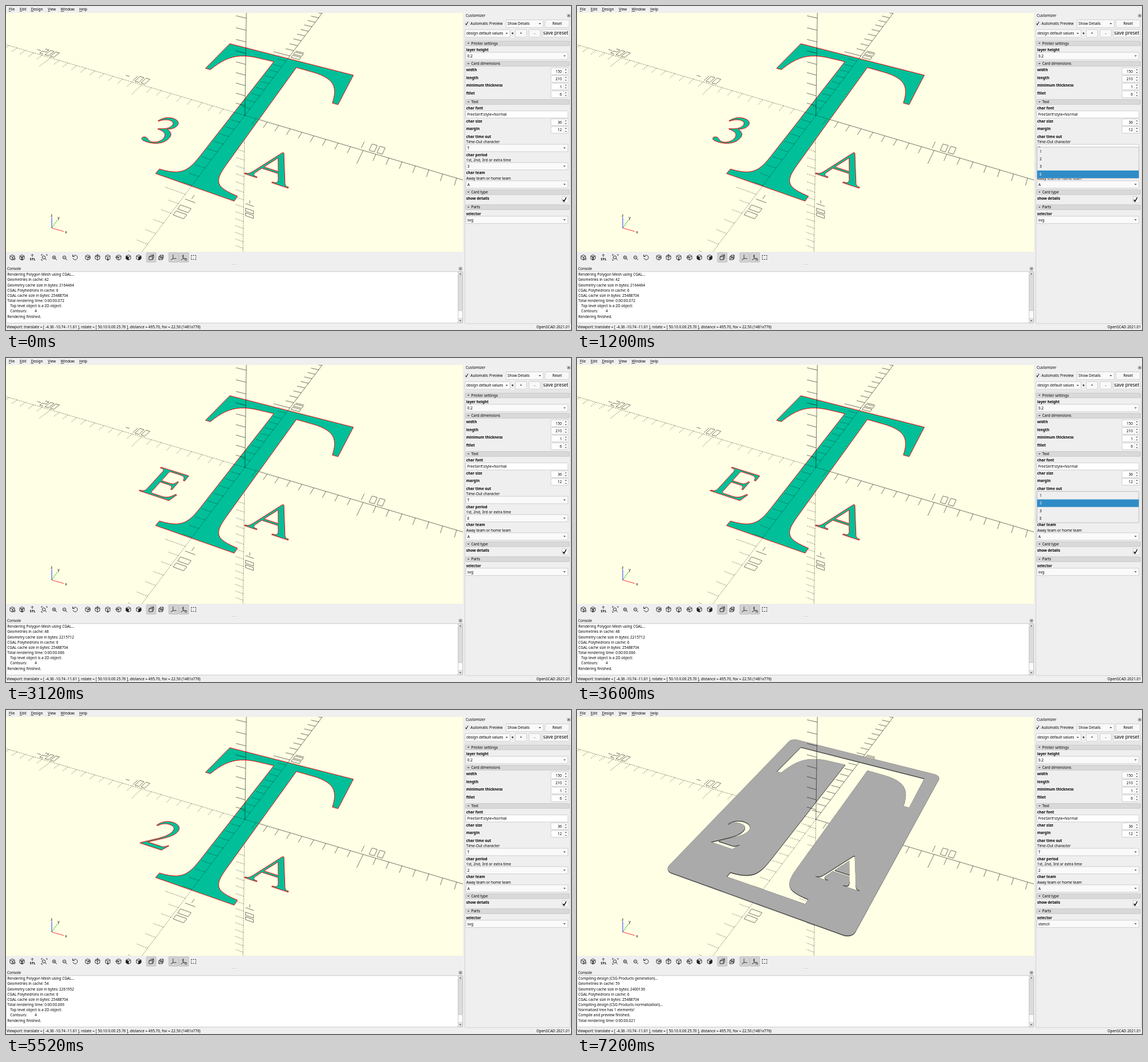
These frames come from a looping animation (988x567 px, 8 s). An HTML page:

```html
<!DOCTYPE html>
<html lang="en">
<head>
<meta charset="utf-8">
<title>Customizer demo</title>
<style>
  html, body { margin: 0; width: 100%; height: 100%; overflow: hidden; background: #efefef; }
  svg { display: block; font: 6.45px "Noto Sans", sans-serif; }
  text { white-space: pre; }
  .line { fill: none; stroke: #000; stroke-width: .55; }
  .dash { stroke-dasharray: 1.6 1.6; }
  .icon { fill: none; stroke: #222; stroke-width: .9; stroke-linejoin: round; }
</style>
</head>
<body>
<svg id="stage" width="988" height="567" viewBox="0 0 988 567"></svg>
<script>
const STEP = 1200, LOOP = 8000;

// ---- camera: translate, rotate, distance and field of view as in the status bar
const DIST = 495.7, RAD = Math.PI / 180;
const [sinX, cosX, sinZ, cosZ] = [50.1, 25.7].flatMap(a => [Math.sin(a * RAD), Math.cos(a * RAD)]);
const FOCAL = 209 / Math.tan(11.25 * RAD);

function project([px, py, pz = 0]) {
  const x = px + 4.36, y = py + 10.74, z = pz + 11.61;
  const rx = x * cosZ + y * sinZ, ry = y * cosZ - x * sinZ;
  const scale = FOCAL / (DIST + ry * sinX - z * cosX);
  return [399.5 + rx * scale, 221 - (ry * cosX + z * sinX) * scale].map(v => v.toFixed(2));
}
const poly = points => 'M' + points.map(project).join('L');

// ---- letter outlines in 1/1000 em
const GLYPHS = {
  T: 'M593 492L570 492C555 580 522 620 424 622L356 624L356 109C356 39 371 24 454 19L454 0L161 0L161 19C239 24 254 39 254 109L254 624L186 622C88 620 55 580 40 492L17 492L23 662L587 662',
  A: 'M706 0L706 19C660 21 645 34 618 96L367 674L346 674L130 150C84 36 72 22 15 19L15 0L213 0L213 19C165 20 147 31 147 59C147 71 149 83 154 96L199 216L462 216L503 120C516 90 519 70 519 55C519 28 497 20 451 19L451 0M217 257L331 532L447 257',
  E: 'M597 169L569 169C523 63 487 38 380 38L275 38C210 38 201 45 201 80L201 327L336 327C419 327 434 312 443 243L466 243L466 454L443 454C431 380 413 367 336 367L201 367L201 586C201 615 207 624 235 624L353 624C469 624 493 609 514 519L540 519L536 662L12 662L12 643C81 637 99 623 99 553L99 109C99 39 78 21 12 19L12 0L553 0',
  2: 'M474 137L420 0L29 0L29 12L207 201C302 301 344 382 344 470C344 556 292 602 208 602C137 602 91 572 51 490L31 496C49 600 122 676 229 676C344 676 424 604 424 500C424 421 384 343 292 246L128 76L361 76C406 76 422 85 462 142',
  3: 'M61 510L45 514C76 614 138 676 236 676C330 676 391 618 391 537C391 480 362 432 294 393C370 365 431 318 431 219C431 76 322 -14 153 -14C84 -14 41 8 41 43C41 65 57 79 82 79C130 79 160 22 218 22C292 22 352 90 352 168C352 266 293 330 152 331L152 345C240 374 313 420 313 507C313 568 274 608 216 608C153 608 105 575 61 510',
};

function outline(char, ox, oy, sx, sy = sx) {
  const loops = [];
  let pen;
  for (const [, op, args] of GLYPHS[char].matchAll(/([MLC])([^MLC]*)/g)) {
    const n = args.split(' ').map(Number);
    if (op == 'M') loops.push([]);
    const loop = loops.at(-1);
    if (op == 'C') {
      for (let i = 1; i <= 12; i++) {
        const t = i / 12, u = 1 - t;
        const bezier = k => u ** 3 * pen[k] + 3 * u * u * t * n[k] + 3 * u * t * t * n[k + 2] + t ** 3 * n[k + 4];
        loop.push([bezier(0), bezier(1)]);
      }
    } else loop.push(n);
    pen = n.slice(-2);
  }
  return loops.map(loop => loop.map(([x, y]) => [ox + x * sx, oy + y * sy]));
}

const letters = period => [
  ...outline('T', -65.27, -91, 126 / 576, 186 / 662),
  ...outline(period, -63, -62.8, .05),
  ...outline('A', 28, -62.8, .05),
];

function cardOutline() {
  const points = [];
  for (let a = 0; a < 360; a += 90)
    for (let b = a; b <= a + 90; b += 10) {
      const side = (a == 0 || a == 270) ? 1 : -1, end = a < 180 ? 1 : -1;
      points.push([side * 69 + 6 * Math.cos(b * RAD), end * 99 + 6 * Math.sin(b * RAD)]);
    }
  return points;
}

// ---- axes with scale marks and vector digits
const TICK = DIST / 60;
const onAxis = (k, along, off) => k == 0 ? [along, off, 0] : k == 1 ? [off, along, 0] : [off, 0, along];

function axis(k, sign, dashed = sign < 0) {
  let d = poly([[0, 0, 0], onAxis(k, sign * DIST, 0)]);
  for (let i = 10; i < DIST; i += 10)
    d += poly([onAxis(k, sign * i, 0), onAxis(k, sign * i, i % 100 ? -TICK : -2 * TICK)]);
  return `<path class="line ${dashed ? 'dash' : ''}" d="${d}"/>`;
}

const STROKES = { 0: '01540', 1: '04', 2: '102354', '-': '23' };
function scaleLabel(k, sign, start, chars) {
  const gap = TICK / 4, width = TICK / 2, top = TICK + gap;
  const d = [...chars].map((char, n) => poly([...STROKES[char]].map(v => onAxis(k,
    sign * (start + n * (width + gap) + (v % 2 - .5) * width),
    [top, (top + gap) / 2, gap][v >> 1])))).join('');
  return `<path class="line" d="${d}"/>`;
}

function viewport(step, period) {
  const shapes = letters(period);
  const face = (loops, z) => loops.map(l => poly(l.map(([x, y]) => [x, y, z])) + 'Z').join('');
  let out = '<rect y="12" width="799" height="418" fill="#ffffe5"/>';
  out += axis(0, 1) + axis(0, -1) + axis(1, 1) + axis(1, -1) + axis(2, -1)
    + scaleLabel(0, 1, 100, '100') + scaleLabel(0, -1, 100, '001-') + scaleLabel(0, -1, 200, '002-')
    + scaleLabel(1, 1, 100, '001') + scaleLabel(1, -1, 100, '-100') + scaleLabel(2, -1, 100, '-100');
  if (step < 6) {
    const d = face(shapes, 0);
    out += `<path d="${d}" fill="#00bf99" fill-rule="evenodd"/>`
      + `<clipPath id="letters"><path d="${d}" clip-rule="evenodd"/></clipPath>`
      + `<g clip-path="url(#letters)">${axis(0, 1, true) + axis(0, -1) + axis(1, 1, true) + axis(1, -1)}</g>`
      + `<path d="${d}" fill="none" stroke="#f00" stroke-width="1"/>`;
  } else {
    const loops = [cardOutline(), ...shapes];
    const walls = loops.flatMap(l => l.map((p, i) => {
      const q = l[(i + 1) % l.length];
      return `<path d="${poly([[...p, 0], [...q, 0], [...q, 1], [...p, 1]])}Z"/>`;
    })).join('');
    out += `<g fill="#484848" stroke="#484848" stroke-width=".3">${walls}</g>`
      + `<path d="${face(loops, 1)}" fill="#aaa" fill-rule="evenodd"/>`;
  }
  out += axis(2, 1);
  const arm = (d, color) => `<path d="M80 388.500${d}" stroke="${color}" stroke-width=".8"/>`;
  out += arm('L101 394.500', '#f00') + arm('L89.500 375', '#0c0') + arm('V370', '#00f');
  out += text(103.3, 397.5, 'x') + text(90.3, 373, 'y') + text(78.2, 368.5, 'z');
  return `<g clip-path="url(#view)">${out}</g>`;
}

// ---- widgets
const text = (x, y, s, attrs = '') => `<text x="${x}" y="${y}" ${attrs}>${s}</text>`;
const bold = (x, cy, s) => text(x, cy + 2.2, s, 'font-weight="700"');
const middle = (x, cy, s, attrs = '') => text(x, cy + 2.3, s, 'text-anchor="middle" ' + attrs);
const box = (x, y, w, h, fill = '#fff', stroke = '#b4b4b4', r = 1) =>
  `<rect x="${x}" y="${y}" width="${w}" height="${h}" rx="${r}" fill="${fill}" stroke="${stroke}" stroke-width=".6"/>`;
const triangle = (x, y, s = 2) => `<path d="M${x - s} ${y - s / 2}h${2 * s}l${-s} ${s * 1.1}z" fill="#444"/>`;
const closer = (x, y) => box(x - 2.4, y - 2.4, 4.8, 4.8, '#eee', '#555') +
  `<path class="icon" d="M${x - 1.3} ${y - 1.3}l2.600 2.600m0-2.600l-2.600 2.600"/>`;
const tickMark = (x, y, s) => `<path d="M${x - 3 * s} ${y}l${2 * s} ${3 * s}l${4 * s}${-7 * s}" fill="none" stroke="#000" stroke-width="${1.5 * s}"/>`;
const combo = (x, cy, w, s, h = 12.8) => box(x, cy - h / 2, w, h, '#fafafa') + text(x + 2.5, cy + 2.3, s) + triangle(x + w - 6, cy);
const button = (x, y, w, s, attrs) => box(x, y, w, 13.5, '#f8f8f8') + middle(x + w / 2, y + 6.8, s, attrs);
const section = (cy, s) => box(803.8, cy - 4.3, 181.2, 8.6, '#d9d9d9', '#b8b8b8') + triangle(808.7, cy, 1.9) + text(813.5, cy + 2.3, s);
const spin = (cy, s) => box(953, cy - 5.8, 30, 11.6) + text(972, cy + 2.6, s, 'text-anchor="end"')
  + `<path d="M975 ${cy - 5.8}v11.600" stroke="#ccc" stroke-width=".5"/>`
  + triangle(979, cy + 2.7, 1.7) + `<path d="M977.300 ${cy - 1.8}h3.400l-1.700-1.900z" fill="#444"/>`;

function popup(y, items, chosen) {
  return box(804.3, y, 178.4, 54.6, '#efefef', '#a0a0a0', 0) + items.map((s, i) => {
    const top = y + .5 + i * 13.45, on = i == chosen;
    return (on ? `<rect x="804.600" y="${top}" width="177.800" height="13.300" fill="#308cc6"/>` : '')
      + text(809, top + 9, s, on ? 'fill="#fff"' : '');
  }).join('');
}

function customizer(step, period) {
  let out = text(804, 19.3, 'Customizer') + closer(984, 17);
  out += box(803, 27.7, 6.6, 6.6) + tickMark(805.7, 30.7, .7) + text(812.3, 33.3, 'Automatic Preview');
  out += combo(874.5, 31, 65, 'Show Details', 13.5) + button(942.5, 24.2, 42.5, 'Reset');
  out += combo(802.5, 48, 79, 'design default values', 13.5) + text(884, 50.5, '*', 'font-weight="700"');
  out += button(890.5, 41.2, 20, '+') + button(914.5, 41.2, 20, '-') + button(937.5, 41.2, 47.5, 'save preset', 'font-size="8.2"');
  out += box(802.4, 57.8, 184.4, 498, 'none', '#bdbdbd');

  out += section(65.3, 'Printer settings') + bold(804.8, 76.5, 'layer height') + combo(804.3, 87.4, 178.4, '0.2');
  out += section(101, 'Card dimensions');
  [['width', 150, 114], ['length', 210, 127.4], ['minimum thickness', 1, 140.9], ['fillet', 6, 154.4]]
    .forEach(([s, v, y]) => out += bold(804.8, y - 2, s) + spin(y, v));
  out += section(167.9, 'Text') + bold(804.8, 179, 'char font');
  out += box(804.3, 183.6, 178.4, 12.4) + text(806.5, 192.2, 'FreeSerif:style=Normal');
  out += bold(804.8, 201.4, 'char size') + spin(203.4, 36) + bold(804.8, 214.8, 'margin') + spin(216.8, 12);
  [['char time out', 'Time-Out character', 'T', 228.4], ['char period', '1st, 2nd, 3rd or extra time', period, 260.3],
   ['char team', 'Away team or home team', 'A', 292.2]]
    .forEach(([s, hint, v, y]) => out += bold(804.8, y, s) + text(804.8, y + 11.4, hint) + combo(804.3, y + 20.1, 178.4, v));
  out += section(325.8, 'Card type') + bold(804.8, 337, 'show details') + box(972.3, 333.5, 10.6, 10.6) + tickMark(976.7, 339, 1);
  out += section(352.1, 'Parts') + bold(804.8, 363.3, 'selector') + combo(804.3, 374.3, 178.4, step == 6 ? 'stencil' : 'svg');

  const periods = ['1', '2', '3', 'E'];
  if (step == 1) out += popup(247, periods, 3);
  if (step == 3) out += popup(233.5, periods, 1);
  if (step == 5) out += popup(367.6, ['svg', 'stencil', 'card', 'card_text'], 1);
  return out;
}

// ---- toolbar
const CUBE = 'M0-4.500L4-2.500V2.500L0 4.500L-4 2.500V-2.500ZM-4-2.500L0-.5L4-2.500M0-.5V4.500';
const LENS = 'M1.800 0A2.800 2.800 0 1 1-3.800 0A2.800 2.800 0 1 1 1.800 0M1 2L4 4.500';
const ARROWS = ['M5 0H1m1.500-1.500L1 0l1.500 1.500', 'M0-6V-2m-1.500-1.500L0-2l1.500-1.500', 'M0 6V2m-1.500 1.500L0 2l1.500 1.500', 'M-6 0H-1m-1.500-1.500L-1 0l-1.500 1.500'];
const AXES = 'M-1-5V2H5M-1 2L-5 4.500';
const ICONS = [
  [11, CUBE + 'M0 0l2.500 2.500l-2.500 2.500M3 0l2.500 2.500l-2.500 2.500'], [28, CUBE + 'M-2-1h4l-4 5h4z'], [46, 'M0-1V-5.500m-2 2L0-5.500l2 2'],
  [67, LENS + 'M-5-3V-5H-3M3-5H5V-3M-5 3V5H-3'], [85, LENS + 'M-2.300 0h2.600M-1-1.300v2.600'], [103, LENS + 'M-2.300 0h2.600'],
  [121, 'M-3.500-2A4 4 0 1 1-4 1M-4.500-5V-1.500H-1'],
  ...ARROWS.map((a, i) => [[143, 160, 178, 197][i], CUBE + a]),
  [214, CUBE, 'M-4-2.500L0-.5V4.500L-4 2.500Z'], [232, CUBE, 'M0-.5L4-2.500V2.500L0 4.500Z'],
  [254, 'M-4-1L2-2V4L-4 4ZM-4-1L0-4L4-4.500L2-2M4-4.500V1L2 4'], [271, 'M-4-1H2V4H-4ZM-4-1L-1-4H4L2-1M4-4V1L2 4M-1-4V1H4M-1 1L-4 4'],
  [293, AXES], [311, AXES + 'M-3-3h2M-3-1h2'], [328, 'M-4-2V-3.500H-2.500M-1-3.500H1M2.500-3.500H4V-2M4-.8V.8M4 2V3.500H2.500M1 3.500H-1M-2.500 3.500H-4V2M-4 .8V-.8'],
];

function toolbar() {
  let out = [254, 293, 311].map(x => box(x - 8.3, 431.7, 16.6, 16.6, '#d2d2d2', '#aaa')).join('');
  out += ICONS.map(([x, d, fill]) => `<g transform="translate(${x} 440)" class="icon"><path d="${d}"/>`
    + (fill ? `<path d="${fill}" fill="#222"/>` : '') + '</g>').join('');
  out += middle(46.5, 442.4, 'STL', 'font-size="6" font-weight="700"') + text(311.5, 445.5, '10', 'font-size="4.5"');
  return out + '<path d="M396 452h8" stroke="#aaa" stroke-width=".8" stroke-dasharray="1 1"/>';
}

// ---- console
const cacheLines = (n, bytes) => ['Geometries in cache: ' + n, 'Geometry cache size in bytes: ' + bytes,
  'CGAL Polyhedrons in cache: 6', 'CGAL cache size in bytes: 25488704'];
const rendered = (n, bytes, time) => ['Rendering Polygon Mesh using CGAL...', ...cacheLines(n, bytes),
  'Total rendering time: 0:00:00.' + time, '   Top level object is a 2D object:', '   Contours:        4', 'Rendering finished.'];
const LOGS = [
  rendered(42, 2164464, '072'), rendered(48, 2215712, '066'), rendered(54, 2261952, '069'),
  ['Compiling design (CSG Products generation)...', ...cacheLines(59, 2400136), 'Compiling design (CSG Products normalization)...',
   'Normalized tree has 1 elements!', 'Compile and preview finished.', 'Total rendering time: 0:00:00.021'],
];

function consolePanel(step) {
  let out = text(2, 462.2, 'Console') + closer(794.7, 459.7) + box(.3, 464.8, 798.4, 90, '#fff', '#aaa');
  out += box(790.5, 465, 8, 89.6, '#e0e0e0', '#bbb', 0) + box(790.5, 472, 8, 61, '#dcdcdc', '#bbb')
    + box(790.5, 533, 8, 14, '#fafafa', '#bbb') + triangle(794.5, 551, 1.8)
    + '<path d="M792.700 469.500h3.600l-1.800-2z" fill="#444"/>';
  LOGS[step >> 1].forEach((s, i) => out += text(2.3, 472.3 + i * 9.17, s));
  return out;
}

function scene(step) {
  const period = '3E22'[step >> 1];
  const menu = [['File', 5], ['Edit', 24], ['Design', 43.5], ['View', 73], ['Window', 95.5], ['Help', 128]]
    .map(([s, x]) => text(x, 8, `<tspan text-decoration="underline">${s[0]}</tspan>` + s.slice(1))).join('');
  return '<clipPath id="view"><rect y="12" width="799" height="418"/></clipPath><rect width="988" height="567" fill="#efefef"/>'
    + menu + viewport(step, period) + toolbar() + consolePanel(step) + customizer(step, period)
    + text(1, 564, 'Viewport: translate = [ -4.36 -10.74 -11.61 ], rotate = [ 50.10 0.00 25.70 ], distance = 495.70, fov = 22.50 (1481x776)')
    + text(986, 564, 'OpenSCAD 2021.01', 'text-anchor="end"');
}

const stage = document.getElementById('stage');
let shown = -1;
function tick() {
  const step = Math.floor(performance.now() % LOOP / STEP);
  if (step != shown) stage.innerHTML = scene(shown = step);
  requestAnimationFrame(tick);
}
tick();
</script>
</body>
</html>
```
